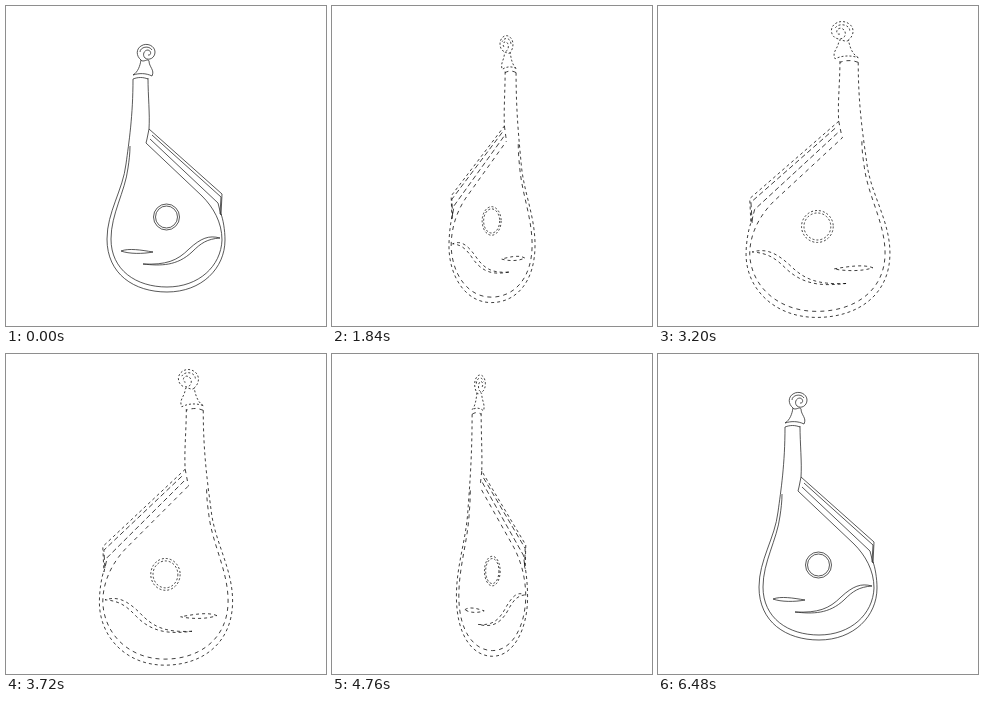
An HTML page with a canvas for the animation above (7000 ms loop, 320 by 320 pixels).

```html
<!DOCTYPE html>
<html lang="en">
<head>
<meta charset="utf-8">
<title>Spinning bandura</title>
<style>
html, body { margin: 0; width: 100%; height: 100%; overflow: hidden; background: #fff; }
canvas { display: block; width: 320px; height: 320px; }
</style>
</head>
<body>
<canvas id="stage" width="320" height="320"></canvas>
<script>
const ctx = document.getElementById('stage').getContext('2d');
const LOOP = 7000, START = 560, MID = 3400, END = 6480, STEP = 40;
const AXIS = 160, LEVEL = 166.4, GROWTH = 0.23;

// Instrument outlines as absolute path data
const outer = [
  'M127 73 C127 110 123 136 120 158 C117 184 101 206 101 233 C101 268 128 286 161 286 C196 286 219 262 219 234 C219 224 217 213 215 208',
  'M142 72 C142 90 144 108 143 123 L216 188 L215 209'
];
const inner = [
  'M124 140 C124 148 123 155 122 162 C119 186 105 208 105 233 C105 264 130 281 161 281 C193 281 215 260 216 234 C216 216 207 201 196 190 L140 137',
  'M127 73 C132 71 137 71 142 73',
  'M143 123 L141 133 L140 137'
];
const strings = [
  'M146 129 L215 191 L214 208',
  'M144 133 L212 197 L215 209'
];
const stringBand = 'M145 126 L216 190 L215 208 L212 198 L143 134 Z';
const stringGap = 'M145 130 L214 194';
const head = [
  'M127 69 C132 66 134 60 135 54 C130 50 130 43 135 40 C141 36 149 40 149 46 C149 52 143 55 139 52 C136 49 138 44 142 44 C146 45 145 50 142 49',
  'M135 54 C137 57 142 52 143 55 C143 61 149 64 146 70 C140 67 133 67 127 69',
  'M134 46 C134 41 143 39 146 44'
];
const headFill = 'M127 68 C134 65 136 59 138 53 C143 57 144 64 147 68 C140 66 133 66 127 68 Z';
const hook = 'M138 54 C131 48 135 42 141 42 C147 42 148 48 143 50';
const marks = [
  'M115 245 C123 242 135 244 147 246 C137 248 123 248 115 245 Z',
  'M137 258 C160 259 171 255 183 243 C195 232 203 229 214 232 C201 233 195 237 186 246 C171 260 155 260 137 258 Z'
];

const ease = p => (1 - Math.cos(Math.PI * p)) / 2;

function pose(time) {
  const t = Math.min(END, Math.max(START, Math.floor(time / STEP) * STEP));
  if (t < MID) {
    const e = ease((t - START) / (MID - START));
    return { turn: 540 * e, grow: e };
  }
  const p = (t - MID) / (END - MID);
  const lead = 0.12 * Math.sin(Math.PI * p) * (1 - p) ** 3;
  return { turn: 540 + 540 * ease(p + lead), grow: 1 - ease(p) };
}

function draw(time) {
  const { turn, grow } = pose(time);
  const c = Math.cos(turn * Math.PI / 180);
  const size = 1 + GROWTH * grow;
  const back = Math.max(0, -c);
  const wide = Math.abs(c);
  const rough = wide < 0.9 || grow > 0.9;
  const narrow = wide < 0.5, edgeOn = wide < 0.36;

  const place = (x, y) => {
    const dy = y - LEVEL;
    const lean = 1 - back * (dy < 0 ? 0.04 : 0.012);
    return [AXIS + (x - AXIS) * size * c, LEVEL + dy * size * lean];
  };
  const shape = d => new Path2D(d.replace(/([\d.]+) ([\d.]+)/g,
    (_, x, y) => place(+x, +y).map(n => n.toFixed(2)).join(' ')));
  const lines = (list, dash = []) => {
    ctx.setLineDash(rough ? dash : []);
    list.forEach(d => ctx.stroke(shape(d)));
  };
  const ring = r => {
    const path = new Path2D();
    const [x, y] = place(160.5, 211);
    path.ellipse(x, y, r * size * wide, r * size, 0, 0, 2 * Math.PI);
    return path;
  };

  ctx.fillStyle = '#fff';
  ctx.fillRect(0, 0, 320, 320);
  ctx.fillStyle = '#000';
  ctx.strokeStyle = rough ? '#000' : '#222';
  ctx.lineWidth = 0.75;
  ctx.lineJoin = 'round';

  lines(outer, [3, 3]);
  lines(inner, edgeOn ? [] : [4, 4]);
  lines(strings, [5, 3]);
  lines(head, [2, 2]);
  lines(marks, edgeOn ? [] : [3, 3]);

  ctx.setLineDash(rough ? [2, 2] : []);
  ctx.stroke(ring(13));
  if (narrow) {
    ctx.fill(ring(10.5));
    ctx.fill(shape(headFill));
    ctx.lineWidth = 1.5;
    lines([hook]);
  } else {
    ctx.stroke(ring(11));
  }
  if (edgeOn) {
    ctx.fill(shape(stringBand));
    ctx.strokeStyle = '#fff';
    ctx.lineWidth = 0.8;
    lines([stringGap]);
  }
}

const begin = performance.now();
function tick() {
  draw((performance.now() - begin) % LOOP);
  requestAnimationFrame(tick);
}
tick();
</script>
</body>
</html>
```
